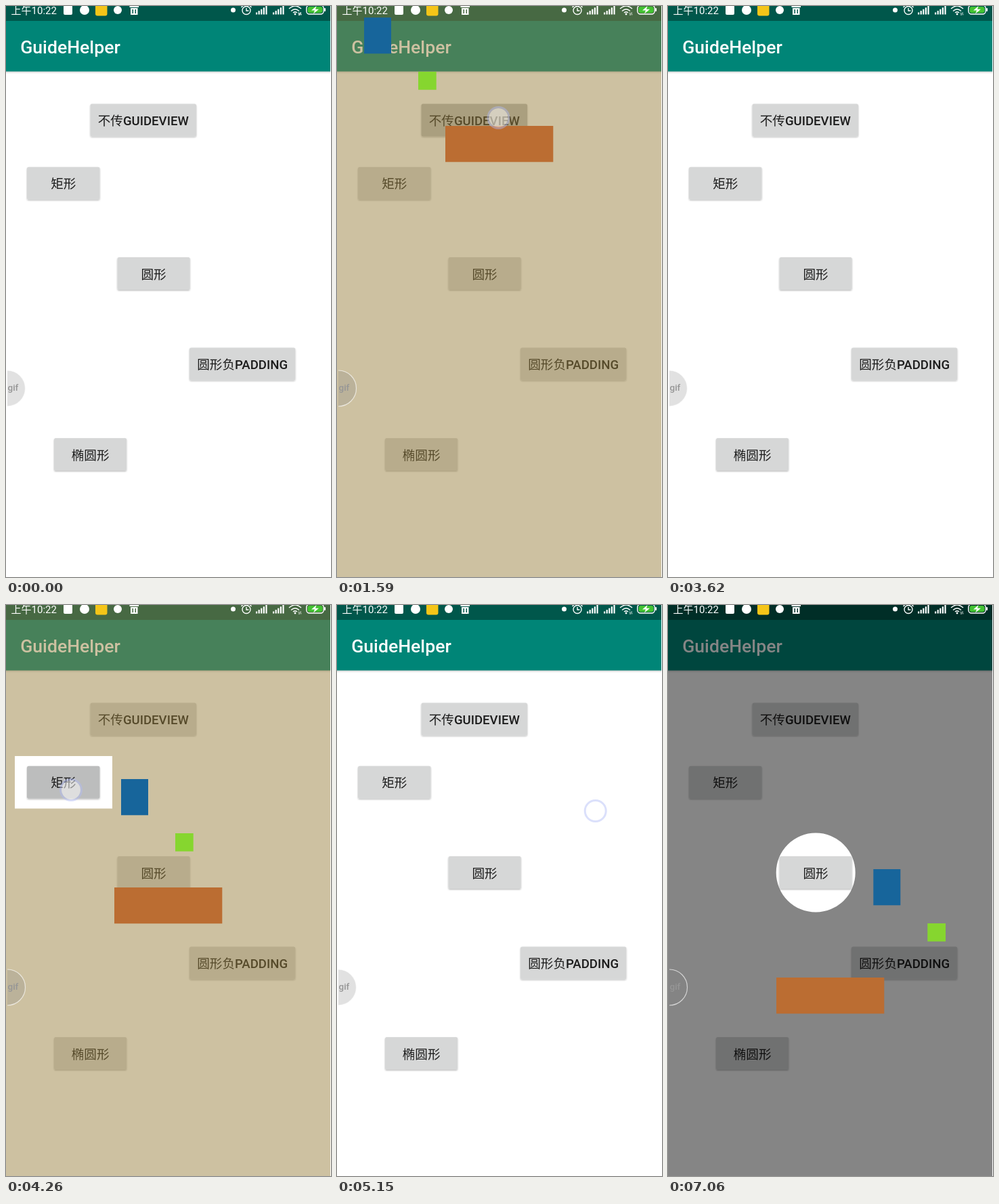
An HTML page that plays this animation: 480 px wide and 843 px high, repeating every 8000 ms.

```html
<!DOCTYPE html>
<html lang="zh">
<head>
<meta charset="utf-8">
<title>GuideHelper</title>
<style>
  html, body { margin: 0; width: 100%; height: 100%; overflow: hidden; background: #fff; }
  svg { display: block; width: 100vw; height: 100vh; }
  text { font-family: Roboto, "Noto Sans CJK SC", "Noto Sans CJK", sans-serif; }
  .cjk { font-family: "Noto Sans CJK SC", "Noto Sans CJK", sans-serif; font-weight: 400; }
  .label { font-size: 18.6px; font-weight: 500; text-anchor: middle; fill: #1c1c1c; }
  .line { fill: none; stroke: #fff; stroke-width: 1.4; }
</style>
</head>
<body>
<svg viewBox="0 0 480 843" preserveAspectRatio="none">
  <defs>
    <filter id="soft" x="-10%" y="-20%" width="120%" height="150%">
      <feDropShadow dx="0" dy="1.2" stdDeviation="1.3" flood-opacity=".28"/>
    </filter>
    <linearGradient id="fall" x2="0" y2="1">
      <stop stop-opacity=".2"/><stop offset="1" stop-opacity="0"/>
    </linearGradient>
    <clipPath id="press"><rect rx="2.5"/></clipPath>
    <clipPath id="edge"><rect x="2" y="530" width="40" height="70"/></clipPath>
  </defs>

  <rect width="480" height="843" fill="#fff"/>
  <rect y="96" width="480" height="4" fill="url(#fall)"/>
  <rect width="480" height="96.6" fill="#008577"/>
  <rect width="480" height="22" fill="#00574b"/>
  <text x="21.2" y="69.5" font-size="26.6" font-weight="500" fill="#fff">GuideHelper</text>

  <g id="buttons"></g>
  <circle id="ripple" clip-path="url(#press)" fill-opacity=".12"/>
  <g id="labels"></g>

  <g id="guide">
    <path id="shade" fill-rule="evenodd"/>
    <rect id="blue" width="40" height="53.3" fill="#17659b"/>
    <rect id="green" width="26.7" height="26.7" fill="#86d62f"/>
    <rect id="orange" width="159.3" height="53.3" fill="#bb6d32"/>
  </g>

  <g id="status" fill="#fff">
    <text x="7.5" y="12" font-size="15"><tspan class="cjk">上午</tspan>10:22</text>
    <rect x="85" y="-1" width="13" height="14" rx="2"/>
    <circle cx="116" cy="6" r="7"/>
    <rect x="132" y="-3" width="17.5" height="17.5" rx="3" fill="#f5c518"/>
    <circle cx="165" cy="6" r="6"/>
    <path fill-rule="evenodd" d="M182.500 0H196V2H182.500ZM184 3H194.500V13H184ZM186.500 5V11H188V5ZM190.500 5V11H192V5Z"/>
    <circle cx="335.500" cy="6" r="3.500"/>
    <circle class="line" cx="355" cy="6.500" r="6"/>
    <path class="line" d="M355 3V7H358.500M347.500 2L350.500 -1M362.500 2L359.500 -1"/>
    <g id="bars"></g>
    <path class="line" stroke-width="1.8" d="M418 4Q427 -4 436 4M421 7.500Q427 2 433 7.500M424 10Q427 7.500 430 10"/>
    <circle cx="427" cy="12" r="1.400"/>
    <path id="traffic" d="M431 11L432.500 9L434 11V14H432V11ZM434.500 9H436V12H437L435.500 14L434 12Z" opacity=".8"/>
    <rect x="443.700" y="-1" width="25.500" height="13" rx="4.500" class="line"/>
    <rect x="445.500" y="1" width="22" height="9.300" rx="3" fill="#43c332"/>
    <rect x="470" y="3" width="2" height="5" rx="1"/>
    <path d="M458.500 0L451 6.500H456L454 11.500L462 4.800H457Z"/>
  </g>

  <g clip-path="url(#edge)">
    <circle cx="2" cy="564.500" r="26.500" fill="#808080" fill-opacity=".24" stroke="#fff" stroke-opacity=".65" stroke-width="1.200"/>
    <text x="2.500" y="568" font-size="13.500" font-weight="500" fill="#969696">gif</text>
  </g>

  <g id="dot">
    <circle id="disc" r="14" fill="#fff"/>
    <circle r="15.500" fill="none" stroke="#b0baf5" stroke-opacity=".45" stroke-width="3"/>
  </g>
  <rect x="479" width="1" height="843" fill="#fff"/>
</svg>
<script>
const LOOP = 8000;
const $ = id => document.getElementById(id);
const clamp = v => Math.max(0, Math.min(1, v));

function set(el, attrs) {
  for (const key in attrs) el.setAttribute(key, attrs[key]);
  return el;
}
function add(parent, tag, attrs) {
  return parent.appendChild(set(document.createElementNS('http://www.w3.org/2000/svg', tag), attrs));
}

// Progress from start to end, moving in hard ticks
function stepped(t, start, end, tick) {
  return clamp(Math.floor((t - start) / tick) * tick / (end - start));
}

const buttons = [
  { x: 124.5, y: 144.5, w: 156.5, cjk: '不传', latin: 'GUIDEVIEW' },
  { x: 31, y: 237.8, w: 107.5, cjk: '矩形' },
  { x: 164.5, y: 371, w: 107.2, cjk: '圆形' },
  { x: 271, y: 504.5, w: 156.3, cjk: '圆形负', latin: 'PADDING' },
  { x: 71, y: 638, w: 107.2, cjk: '椭圆形' }
];
const BTN_H = 48;

for (const b of buttons) {
  add($('buttons'), 'rect', { x: b.x, y: b.y, width: b.w, height: BTN_H, rx: 2.5, fill: '#d6d7d7', filter: 'url(#soft)' });
  const label = add($('labels'), 'text', { x: b.x + b.w / 2, y: b.y + 31.5, class: 'label' });
  add(label, 'tspan', { class: 'cjk' }).textContent = b.cjk;
  if (b.latin) add(label, 'tspan', {}).textContent = b.latin;
}

for (const x of [369, 394]) {
  for (let i = 0; i < 5; i++) {
    const h = 3 + i * 2.4;
    add($('bars'), 'rect', { x: x + i * 3.6, y: 12.5 - h, width: 2.2, height: h });
  }
}

// Time on screen, marker positions and cut-out of each guide
const guides = [
  { show: 1395, hide: 2740, blue: [40, 17], green: [120, 97], orange: [160, 177], hole: '' },
  { show: 4070, hide: 5150, blue: [170, 257], green: [250, 337], orange: [160, 417], hole: 'M13 223H157V300.500H13Z' },
  { show: 6315, hide: LOOP, blue: [303.3, 390], green: [383.3, 470], orange: [160, 550], hole: 'M159.700 395a58.500 58.500 0 1 0 117 0a58.500 58.500 0 1 0 -117 0Z' }
];
const FADE = 240;
const DIM = .48;

// Touches on a button also carry the ripple's start and full times
const touches = [
  { x: 238.5, y: 165, down: 860, up: 1680, button: 0, start: 1060, full: 1480 },
  { x: 340, y: 279, down: 2650, up: 3620 },
  { x: 96, y: 273, down: 3780, up: 4840, button: 1, start: 3860, full: 4120 },
  { x: 381.7, y: 304, down: 5080, up: 5950 },
  { x: 226, y: 400, down: 6160, up: 6990, button: 2, start: 6240, full: 6510 }
];

function drawRipple(touch, t) {
  const on = touch && touch.button !== undefined;
  $('ripple').style.display = on ? '' : 'none';
  if (!on) return;
  const b = buttons[touch.button];
  const p = .25 + .75 * stepped(t, touch.start, touch.full, 82);
  const cx = b.x + b.w / 2, cy = b.y + BTN_H / 2;
  set($('press').firstElementChild, { x: b.x, y: b.y, width: b.w, height: BTN_H });
  set($('ripple'), {
    cx: touch.x + (cx - touch.x) * p,
    cy: touch.y + (cy - touch.y) * p,
    r: Math.hypot(b.w, BTN_H) / 2 * p
  });
}

function drawDot(touch, t) {
  $('dot').style.display = touch ? '' : 'none';
  if (!touch) return;
  set($('dot'), { transform: `translate(${touch.x} ${touch.y})` });
  set($('disc'), { 'fill-opacity': .75 - .25 * clamp((t - touch.down) / 400) });
}

function drawGuide(t) {
  const g = guides.find(s => t >= s.show && t < s.hide);
  const p = g ? stepped(t, g.show, g.show + FADE, 95) : 0;
  $('guide').style.display = p ? '' : 'none';
  if (!p) return;
  // The shade is ochre while fading in and settles to black
  set($('shade'), {
    d: 'M0 0H480V843H0Z' + g.hole,
    fill: p < 1 ? '#967c39' : '#000',
    'fill-opacity': DIM * (1 - (1 - p) ** 3)
  });
  for (const id of ['blue', 'green', 'orange']) set($(id), { x: g[id][0], y: g[id][1] });
}

function draw(t) {
  const touch = touches.find(s => t >= s.down && t < s.up);
  drawRipple(touch, t);
  drawDot(touch, t);
  drawGuide(t);
  $('traffic').style.opacity = t < 540 || (t >= 5950 && t < 6990) ? .8 : .45;
}

const begin = performance.now();
function tick() {
  draw((performance.now() - begin) % LOOP);
  requestAnimationFrame(tick);
}
tick();
</script>
</body>
</html>
```
